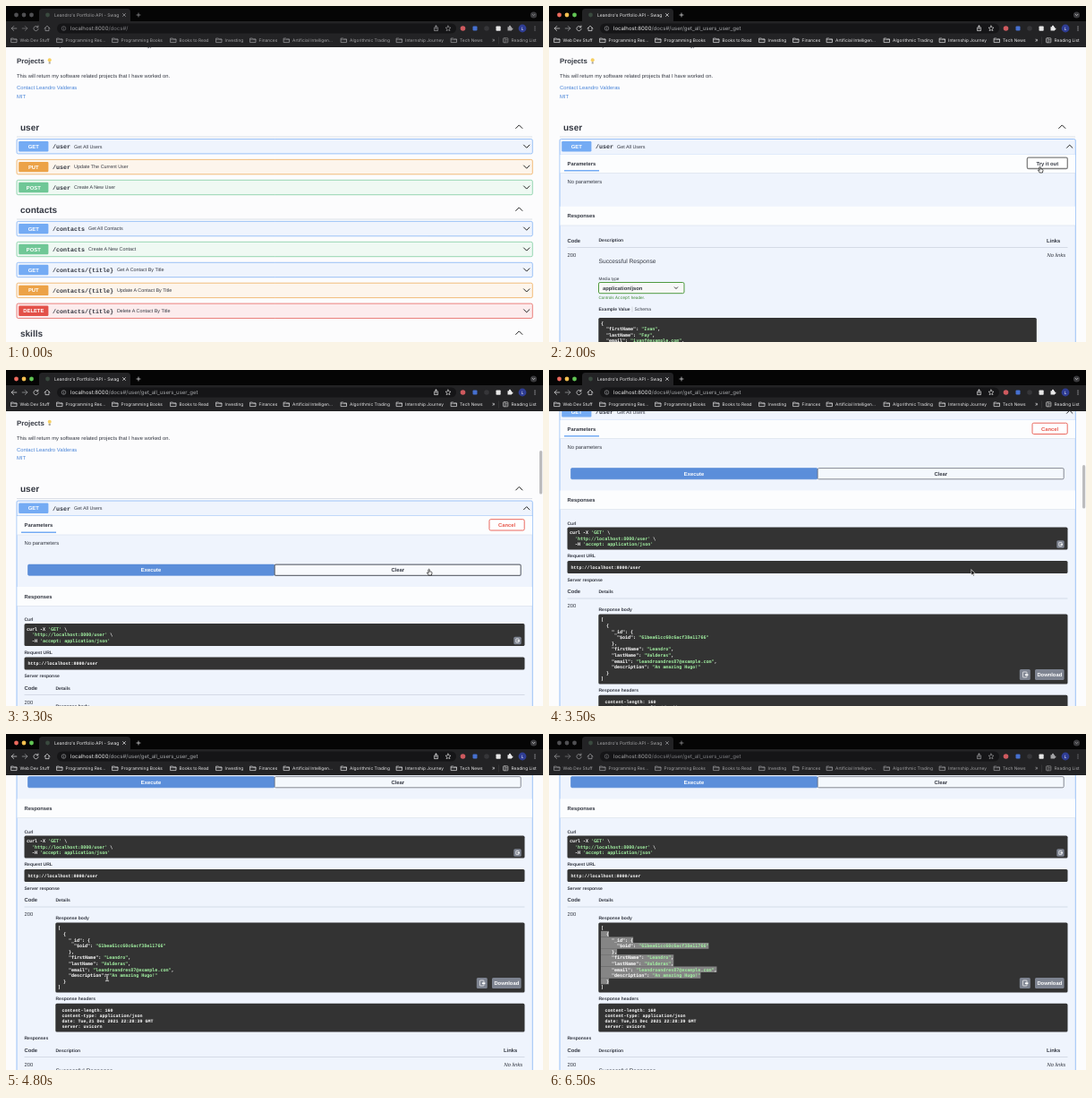
An HTML page with a canvas that plays this animation: 600 px wide and 375 px high, repeating every 6.8 s.

```html
<!DOCTYPE html>
<html lang="en">
<head>
<meta charset="utf-8">
<title>API docs walkthrough</title>
<style>
  html, body { margin: 0; width: 100%; height: 100%; overflow: hidden; background: #fcfcfd; }
  canvas { display: block; width: 600px; height: 375px; }
</style>
</head>
<body>
<canvas id="stage"></canvas>
<script>
const canvas = document.getElementById('stage');
const ctx = canvas.getContext('2d');
const ratio = window.devicePixelRatio || 1;
canvas.width = 600 * ratio;
canvas.height = 375 * ratio;

const LOOP = 6800;
const SANS = '"Liberation Sans", Arial, sans-serif';
const UI = 'Inter, sans-serif';
const SLAB = '"Liberation Mono", monospace';
const CODE = '"DejaVu Sans Mono", monospace';
const INK = '#343842', BLOCK = '#333333', GREEN = '#a2f0a2', BUTTON = '#7d8390';
const METHODS = {
  GET: ['#74abf4', '#eff4fd'],
  PUT: ['#eca247', '#fdf5ec'],
  POST: ['#6fc796', '#eff9f3'],
  DELETE: ['#e35149', '#fceced'],
};

// ---------- drawing helpers; text y is the middle of the capitals ----------
function text(str, x, y, { size = 5.83, bold, italic, color = INK, font = SANS, align = 'left' } = {}) {
  ctx.font = `${italic ? 'italic ' : ''}${bold ? 'bold ' : ''}${size}px ${font}`;
  ctx.fillStyle = color;
  ctx.textAlign = align;
  ctx.fillText(str, x, y + size * 0.35);
  return x + ctx.measureText(str).width;
}

function box(x, y, w, h, fill, { r = 0, stroke, line = 0.6 } = {}) {
  ctx.beginPath();
  ctx.roundRect(x, y, w, h, r);
  if (fill) { ctx.fillStyle = fill; ctx.fill(); }
  if (stroke) { ctx.strokeStyle = stroke; ctx.lineWidth = line; ctx.stroke(); }
}

function dot(x, y, r, fill, stroke) {
  box(x - r, y - r, 2 * r, 2 * r, fill, { r, stroke });
}

function path(d, x, y, { stroke, fill, line = 0.7 } = {}) {
  const shape = new Path2D(d);
  ctx.save();
  ctx.translate(x, y);
  ctx.lineWidth = line;
  ctx.lineJoin = ctx.lineCap = 'round';
  if (fill) { ctx.fillStyle = fill; ctx.fill(shape); }
  if (stroke) { ctx.strokeStyle = stroke; ctx.stroke(shape); }
  ctx.restore();
}

function chevron(x, y, up, w = 3.2, color = '#222', line = 1) {
  const h = up ? -w / 2 : w / 2;
  path(`M${-w} ${-h}L0 ${h}L${w} ${-h}`, x, y, { stroke: color, line });
}

const rule = (y, x1 = 20.5, x2 = 579.5) => box(x1, y, x2 - x1, 0.5, '#b9c2cf');
const label = (str, x, y, size = 5) => text(str, x, y, { size, bold: true });

// Quoted values are green, everything else white.
function codeLine(str, x, y) {
  str.split(/('[^']*'|(?<=: )"[^"]*")/).forEach((part, i) => {
    x = text(part, x, y, { size: 5, bold: true, font: CODE, color: i % 2 ? GREEN : '#fff' });
  });
}

function copyButton(x, y, s) {
  box(x, y, s, s, BUTTON, { r: 1.5 });
  box(x + s * 0.3, y + s * 0.25, s * 0.38, s * 0.5, null, { r: 0.5, stroke: '#fff', line: 0.7 });
  box(x + s * 0.5, y + s * 0.45, s * 0.3, s * 0.14, '#fff');
}

// ---------- timing ----------
function track(t, keys) {
  if (t <= keys[0][0]) return keys[0].slice(1);
  for (let i = 1; i < keys.length; i++) {
    const a = keys[i - 1], b = keys[i];
    if (t <= b[0]) {
      const k = (t - a[0]) / (b[0] - a[0]);
      return a.slice(1).map((v, j) => v + (b[j + 1] - v) * k);
    }
  }
  return keys[keys.length - 1].slice(1);
}

const SCROLL = [[3200, 0], [3300, 2.5], [3400, 54], [3500, 110], [3600, 140], [3700, 155],
  [3800, 164], [3900, 169], [4000, 171], [4100, 172]];
const POINTER = [[200, 345, 368], [400, 330, 300], [600, 312, 205], [800, 300, 157], [1600, 300, 157],
  [1800, 490, 176], [2000, 549, 182], [2300, 549, 182], [2500, 515, 206], [2800, 473, 225],
  [4100, 473, 225], [4300, 370, 240], [4500, 190, 266], [4600, 139, 271], [4700, 139, 271],
  [4800, 113, 272], [5000, 92, 275], [5300, 68, 277], [5500, 68, 277], [6000, 59, 221]];

// ---------- browser window ----------
const BOOKMARKS = [[6, 'Web Dev Stuff'], [57, 'Programming Res...'], [119, 'Programming Books'],
  [184, 'Books to Read'], [235, 'Investing'], [273, 'Finances'], [310.5, 'Artificial Intelligen...'],
  [374.5, 'Algorithmic Trading'], [436.5, 'Internship Journey'], [497.5, 'Tech News']];

function browser(focused, open) {
  const ink = focused ? '#e9e9ea' : '#a3a3a5', dim = focused ? '#a5a7aa' : '#7c7d80';
  const bar = '#232325';
  box(0, 0, 600, 18, '#050505');
  box(37, 3, 102, 18, bar, { r: 3.5 });
  box(0, 17, 600, 29, bar);
  ['#ed6a5e', '#f4bf4f', '#61c554'].forEach((c, i) => dot(11.5 + 8.5 * i, 10, 2.4, focused ? c : '#505053'));
  dot(46.5, 10, 2.4, '#3a4a3f');
  text("Leandro's Portfolio API - Swag", 54, 10.3, { size: 5, font: UI, color: ink });
  path('M-1.5-1.5L1.5 1.5M1.5-1.5L-1.5 1.5', 132, 10, { stroke: ink });
  path('M-2 0H2M0-2V2', 148, 10, { stroke: ink });
  dot(589.5, 10, 3.6, '#3b3b3e');
  chevron(589.5, 10, false, 1.4, ink, 0.7);

  path('M2.8 0H-2.8M-.3-2.5L-2.8 0L-.3 2.5', 9, 25, { stroke: ink });
  path('M-2.8 0H2.8M.3-2.5L2.8 0L.3 2.5', 21, 25, { stroke: dim });
  path('M2-1.6A2.6 2.6 0 1 0 2.6.6M2.4-3V-1.2H.6', 33.5, 25, { stroke: ink });
  path('M-3 0L0-2.8L3 0M-2-.6V2.6H2V-.6', 46, 25, { stroke: ink });
  box(57, 19.5, 446, 11, '#151517', { r: 5.5 });
  dot(64.5, 25, 2.3, null, dim);
  box(64.2, 24.4, 0.6, 2, dim);
  box(64.2, 23.4, 0.6, 0.6, dim);
  const end = text('localhost:8000', 72, 25, { size: 6, font: UI, color: ink });
  text('/docs#/' + (open ? 'user/get_all_users_user_get' : ''), end, 25, { size: 6, font: UI, color: dim });
  path('M-1-1H-2V2.6H2V-1H1M0 1V-3M-1.2-2L0-3.2L1.2-2', 480.5, 25, { stroke: ink });
  path('M0-3L.9-1L3-.8L1.4.6L1.9 2.7L0 1.6L-1.9 2.7L-1.4.6L-3-.8L-.9-1Z', 494, 25, { stroke: ink, line: 0.6 });
  dot(510.5, 25, 2.8, '#cf5a5f');
  box(521.5, 22.5, 5, 5, '#4670cf', { r: 1 });
  dot(537, 25, 2.8, '#363639');
  box(547.5, 22.5, 5.2, 5.2, '#e6e6e6', { r: 0.8 });
  path('M-2.5-1.4H-.9A1 1 0 1 1 .9-1.4H2V.1A1 1 0 1 1 2 1.9V3H-2.5Z', 563, 24.6, { fill: ink });
  dot(577, 25, 4.4, '#2f3d94');
  text('L', 577, 25, { size: 4.6, font: UI, color: '#fff', align: 'center' });
  [-2, 0, 2].forEach(d => dot(591, 25 + d, 0.6, ink));

  for (const [x, name] of BOOKMARKS) {
    path('M0-2.2H2.2L3 -1.4H6V2.3H0Z', x, 38.3, { stroke: ink });
    path('M0-.6H6', x, 38.3, { stroke: ink, line: 0.5 });
    text(name, x + 9.6, 38.5, { size: 4.85, font: UI, color: ink });
  }
  text('»', 543, 38.2, { size: 6, font: UI, color: ink });
  box(550.3, 34.5, 0.4, 8, '#4a4a4d');
  box(555.5, 35.8, 5.4, 5, null, { r: 0.6, stroke: ink });
  path('M1.8 0V5M3 1.6H4.4M3 3.2H4.4', 555.5, 35.8, { stroke: ink, line: 0.5 });
  text('Reading List', 564.5, 38.5, { size: 4.85, font: UI, color: ink });
}

// ---------- documentation page ----------
function intro() {
  text('Find here the many skills that I often use in this technology.', 12, 44);
  text('Projects', 12, 61.5, { size: 7.8, bold: true });
  dot(48.7, 60.2, 2, '#f6cf62');
  box(47.7, 62.2, 2, 2.4, '#a9a49a', { r: 0.6 });
  text('This will return my software related projects that I have worked on.', 12, 78.3);
  text('Contact Leandro Valderas', 12, 91.3, { color: '#4a85d8' });
  text('MIT', 12, 100.8, { color: '#4a85d8' });
}

function section(name, y) {
  label(name, 16, y, 10);
  chevron(573.3, y - 0.3, true, 3.6);
  rule(y + 10.8, 12, 588);
}

function operation(method, route, summary, y, open) {
  const [color, tint] = METHODS[method];
  box(12, y - 8.2, 576.3, open ? 600 : 16.4, tint, { r: 1.6, stroke: color, line: 0.7 });
  if (open) box(12, y + 8.2, 576.3, 0.6, color);
  box(14.2, y - 5.7, 33.2, 11.4, color, { r: 1.2 });
  text(method, 30.8, y, { bold: true, color: '#fff', align: 'center' });
  const end = text(route, 52, y, { size: 6.67, bold: true, font: SLAB });
  text(summary, end + 4, y, { size: 5.42 });
  chevron(581.7, y, open);
}

function band(title, y) {
  box(12.4, y - 10.5, 575.6, 21, 'rgba(255,255,255,.8)');
  box(12.4, y + 10.5, 575.6, 0.5, '#d3dbe6');
  label(title, 20.5, y, 5.83);
}

function outlined(str, x, w, color, hover) {
  box(x, 169.2, w, 12.3, hover ? '#fff' : 'rgba(255,255,255,.4)', { r: 1.6, stroke: color, line: hover ? 1.3 : 0.9 });
  text(str, x + w / 2, 175.5, { bold: true, align: 'center', color: color === '#808080' ? INK : color });
}

function tableHead(y, title) {
  label('Code', 20.5, y, 5.83);
  label(title, 55.5, y);
  rule(y + 7.4);
  text('200', 20.5, y + 16);
}

function documented(y) {
  tableHead(y, 'Description');
  label('Links', 556, y, 5.83);
  text('No links', 556.5, y + 16, { italic: true });
  text('Successful Response', 55.5, y + 22.8, { size: 6.67 });
  text('Media type', 55.5, y + 43, { size: 4.7 });
  box(55.5, y + 47, 95.5, 12.2, '#f7f7f7', { r: 1.6, stroke: '#4f9a3f', line: 1 });
  label('application/json', 60, y + 53.2, 5.83);
  chevron(142, y + 53.2, false, 1.7, '#222', 0.9);
  let x = text('Controls ', 55.5, y + 64, { size: 4.6, color: '#3f8a35' });
  x = text('Accept', x, y + 64, { size: 4.6, font: CODE, color: '#3f8a35' });
  text(' header.', x, y + 64, { size: 4.6, color: '#3f8a35' });
  label('Example Value', 55.5, y + 77);
  box(92.8, y + 74, 0.4, 6, '#aaa');
  text('Schema', 95.6, y + 77, { size: 5 });
  box(55.3, y + 86.5, 489.5, 60, BLOCK, { r: 1.6 });
  ['{', '  "firstName": "Ivan",', '  "lastName": "Fay",', '  "email": "ivanf@example.com",']
    .forEach((line, i) => codeLine(line, 58, y + 92.6 + i * 6.5));
}

const CURL = ["curl -X 'GET' \\", "  'http://localhost:8000/user' \\", "  -H 'accept: application/json'"];
const BODY = ['[', '  {', '    "_id": {', '      "$oid": "61bea61cc60c6acf38e11766"', '    },',
  '    "firstName": "Leandro",', '    "lastName": "Valderas",',
  '    "email": "leandroandres87@example.com",', '    "description": "An amazing Hugo!"', '  }', ']'];
const HEADERS = ['content-length: 160', 'content-type: application/json',
  'date: Tue,21 Dec 2021 22:28:39 GMT', 'server: uvicorn'];

function response(selectFrom, focused) {
  label('Curl', 20.5, 281);
  box(20.5, 285.6, 559, 25, BLOCK, { r: 1.6 });
  CURL.forEach((line, i) => codeLine(line, 23, 291.6 + i * 6.55));
  copyButton(567.3, 300.3, 8.4);
  label('Request URL', 20.5, 317.7);
  box(20.5, 323, 559, 14, BLOCK, { r: 1.6 });
  text('http://localhost:8000/user', 24.5, 330, { size: 5, bold: true, font: SLAB, color: '#fff' });
  label('Server response', 20.5, 344);
  tableHead(357.3, 'Details');
  label('Response body', 55.5, 377.4);
  box(55.3, 382.5, 524.2, 78, BLOCK, { r: 1.6 });
  BODY.forEach((line, i) => {
    const y = 388.6 + i * 6.6;
    if (i >= selectFrom && i < 10) box(58, y - 3.3, line.length * 3.01, 6.6, focused ? '#63809e' : '#858585');
    codeLine(line, 58, y);
  });
  copyButton(525.8, 444, 12);
  box(543, 444, 32.6, 12, BUTTON, { r: 1.6 });
  text('Download', 559.3, 450, { bold: true, color: '#fff', align: 'center' });
  label('Response headers', 55.5, 467.5);
  box(55.3, 472.8, 524.2, 31.8, BLOCK, { r: 1.6 });
  HEADERS.forEach((line, i) => text(line, 62.5, 480.2 + i * 5.9, { size: 5, bold: true, font: SLAB, color: '#fff' }));
  label('Responses', 20.5, 511.3);
  documented(525);
}

function executeBar(executed, hoverClear) {
  box(24.5, 219.6, executed ? 275.5 : 550.5, 12.2, '#5b8eda', { r: 1.4, stroke: '#4d83d2' });
  text('Execute', executed ? 162 : 299.8, 225.8, { bold: true, color: '#fff', align: 'center' });
  if (!executed) return;
  box(300.2, 219.6, 275, 12.2, hoverClear ? '#f8fafd' : '#f4f8fd', { r: 1.4, stroke: '#6b6f78', line: hoverClear ? 1.2 : 0.8 });
  text('Clear', 437.7, 225.8, { bold: true, align: 'center' });
}

function collapsedRows() {
  operation('PUT', '/user', 'Update The Current User', 179.6);
  operation('POST', '/user', 'Create A New User', 202.5);
  section('contacts', 227);
  operation('GET', '/contacts', 'Get All Contacts', 248.6);
  operation('POST', '/contacts', 'Create A New Contact', 271.5);
  operation('GET', '/contacts/{title}', 'Get A Contact By Title', 294.5);
  operation('PUT', '/contacts/{title}', 'Update A Contact By Title', 317.4);
  operation('DELETE', '/contacts/{title}', 'Delete A Contact By Title', 340.3);
  section('skills', 365);
}

function expanded(t, tried, executed, focused) {
  band('Parameters', 175.8);
  box(17, 183, 39, 1.4, '#74abf4');
  if (tried) outlined('Cancel', 540, 39.2, '#e8584c');
  else outlined('Try it out', 534.3, 45, '#808080', t >= 1900);
  text('No parameters', 20.5, 195.6);
  if (tried) executeBar(executed, t <= 3300);
  band('Responses', tried ? 255 : 234.3);
  if (executed) {
    const selectFrom = t < 5500 ? 10 : Math.round(track(t, [[5500, 9], [6000, 1]])[0]);
    response(selectFrom, focused);
  } else {
    documented(tried ? 282.5 : 261.5);
  }
}

function pointer(t) {
  const [x, y] = track(t, POINTER);
  if (t >= 4300) {
    path('M-1.4-3.4Q0-3.4 0-2.6Q0-3.4 1.4-3.4M0-2.6V2.6M-1.4 3.4Q0 3.4 0 2.6Q0 3.4 1.4 3.4', x, y, { stroke: '#fff', line: 1.5 });
    path('M-1.4-3.4Q0-3.4 0-2.6Q0-3.4 1.4-3.4M0-2.6V2.6M-1.4 3.4Q0 3.4 0 2.6Q0 3.4 1.4 3.4', x, y, { stroke: '#111', line: 0.6 });
  } else if ((t >= 800 && t <= 1600) || (t >= 1900 && t <= 2300) || (t >= 2700 && t <= 3300)) {
    path('M-1-2.4Q-.4-3.2.2-2.4V-.2L2.4.3Q3.1.6 3 1.4L2.4 4H-.8L-2.6 1.2Q-2.4.4-1 1.2Z', x, y, { fill: '#fff', stroke: '#111', line: 0.7 });
  } else {
    path('M0 0V6L1.4 4.8L2.4 7L3.4 6.5L2.4 4.4H4.2Z', x - 1.2, y - 2, { fill: '#111', stroke: '#fff', line: 0.6 });
  }
}

function draw(now) {
  const t = Math.floor(now % LOOP / 100) * 100;
  const focused = t >= 200 && t < 6200;
  const open = t >= 1000, tried = t >= 2200, executed = t >= 2900;
  const [scroll] = track(t, SCROLL);

  ctx.setTransform(ratio, 0, 0, ratio, 0, 0);
  ctx.textRendering = 'geometricPrecision';
  box(0, 0, 600, 375, '#fcfcfd');
  ctx.save();
  ctx.translate(0, -scroll);
  intro();
  section('user', 135);
  operation('GET', '/user', 'Get All Users', 156.7, open);
  if (open) expanded(t, tried, executed, focused);
  else collapsedRows();
  ctx.restore();

  if (t >= 3200 && t < 4600) box(596, 89.6 + 0.15 * scroll, 3.2, 48.5, '#bcbcbe', { r: 1.6 });
  browser(focused, open);
  if (focused) pointer(t);
  requestAnimationFrame(draw);
}
requestAnimationFrame(draw);
</script>
</body>
</html>
```
